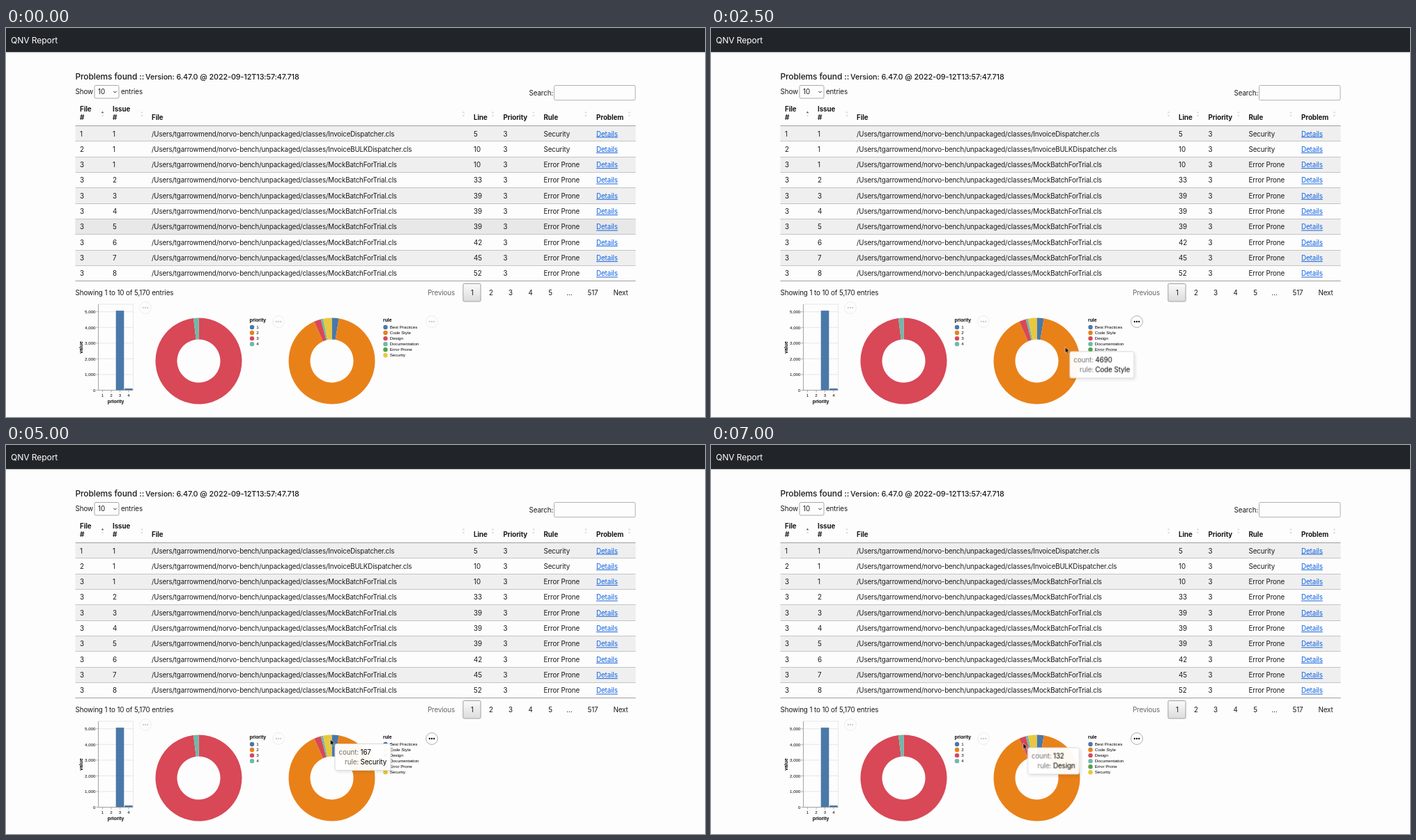
Animation of 1003 by 559 pixels, one loop 8 s. Source, as an HTML page:

```html
<!DOCTYPE html>
<html lang="en">
<head>
<meta charset="utf-8">
<title>QNV Report</title>
<style>
  html, body { margin: 0; width: 100%; height: 100%; overflow: hidden; background: #fdfdfd; }
  body { position: relative; font: 9.8px Inter, "Open Sans", sans-serif; letter-spacing: -.01em; }
  svg { position: absolute; left: 0; top: 0; display: block; }
  text { fill: #171a1d; white-space: pre; }
  .bold { font-weight: 700; }
  .mid { text-anchor: middle; }
  .end { text-anchor: end; }
  .dim { fill: #666; }
  .path { font-size: 9.72px; letter-spacing: -.014em; }
  .link { fill: #0d60e0; text-decoration: underline; }
  .brand { font-size: 12.1px; fill: #fff; }
  .heading { font-size: 11.95px; font-weight: 500; }
  .version { font-size: 10.8px; font-weight: 500; }
  .chart text { font: 6.2px "Liberation Sans", Arial, sans-serif; letter-spacing: 0; fill: #000; }
  .chart .title { font-size: 6.82px; font-weight: 700; }

  .hover, .menu, .tip, .pointer { animation: 8s step-end infinite; }
  .hover { animation-name: hover; }
  .menu { opacity: .2; }
  .menu.live { animation-name: wake; }

  .mouse { position: absolute; left: 0; top: 0; animation: move 8s step-end infinite; }
  .pointer { overflow: visible; animation-name: arrive; }
  .tip {
    position: absolute; left: 6px; top: 6.3px; opacity: 0;
    display: grid; grid-template-columns: auto auto; column-gap: 2.5px;
    padding: 4.5px 5px; border: 1px solid #d9d9d9; border-radius: 3px;
    background: rgba(255, 255, 255, .95); box-shadow: 2px 2px 4px rgba(0, 0, 0, .1);
    line-height: 14px; white-space: nowrap; color: #000;
  }
  .tip i { font-style: normal; text-align: right; color: #707070; }
  .style { animation-name: style; }
  .best { animation-name: best; }
  .security { animation-name: security; }
  .docs { animation-name: docs; }
  .design { animation-name: design; }

  @keyframes move {
    0% { transform: translate(638.5px, 305px); }
    18.75% { transform: translate(508px, 453.5px); }
    31.25% { transform: translate(508.3px, 458.5px); }
    37.5% { transform: translate(477.5px, 437.5px); }
    43.75% { transform: translate(472px, 431px); }
    50% { transform: translate(465.5px, 425px); }
    62.5% { transform: translate(465.5px, 423px); }
    68.75% { transform: translate(454.5px, 423.5px); }
    75% { transform: translate(453px, 426.4px); }
    81.25% { transform: translate(450.5px, 427.5px); }
    87.5%, 100% { transform: translate(448px, 428.5px); }
  }
  @keyframes arrive { 0% { opacity: 0; } 12.5%, 100% { opacity: 1; } }
  @keyframes hover { 0% { opacity: 1; } 18.75%, 100% { opacity: 0; } }
  @keyframes wake { 0% { opacity: .2; } 18.75%, 100% { opacity: 1; } }
  @keyframes style { 0% { opacity: 0; } 18.75% { opacity: 1; } 43.75%, 100% { opacity: 0; } }
  @keyframes best { 0% { opacity: 0; } 43.75% { opacity: 1; } 50%, 100% { opacity: 0; } }
  @keyframes security { 0% { opacity: 0; } 50% { opacity: 1; } 68.75%, 100% { opacity: 0; } }
  @keyframes docs { 0% { opacity: 0; } 68.75% { opacity: 1; } 75%, 100% { opacity: 0; } }
  @keyframes design { 0% { opacity: 0; } 75%, 100% { opacity: 1; } }
</style>
</head>
<body>
<svg id="page" width="1003" height="559" viewBox="0 0 1003 559">
  <defs>
    <linearGradient id="button" x2="0" y2="1">
      <stop stop-color="#fafafa"/><stop offset="1" stop-color="#dcdcdc"/>
    </linearGradient>
  </defs>
</svg>
<div class="mouse">
  <div class="tip style"><i>count:</i><span>4690</span><i>rule:</i><span>Code Style</span></div>
  <div class="tip best"><i>count:</i><span>136</span><i>rule:</i><span>Best Practices</span></div>
  <div class="tip security"><i>count:</i><span>167</span><i>rule:</i><span>Security</span></div>
  <div class="tip docs"><i>count:</i><span>44</span><i>rule:</i><span>Documentation</span></div>
  <div class="tip design"><i>count:</i><span>132</span><i>rule:</i><span>Design</span></div>
  <svg class="pointer" width="7" height="11">
    <path d="M0 0V8.4L1.9 6.7L3.2 9.7L4.7 9L3.4 6.2H6Z" stroke="#fff" stroke-width=".6"/>
  </svg>
</div>
<script>
const page = document.getElementById('page');
const BLUE = '#4a78a8', ORANGE = '#e98119', RED = '#d84857', TEAL = '#70b8a9', GREEN = '#54a24b', YELLOW = '#e9c83e';

function add(tag, attrs, parent = page) {
  const el = document.createElementNS('http://www.w3.org/2000/svg', tag);
  for (const key in attrs) el.setAttribute(key, attrs[key]);
  return parent.appendChild(el);
}
function text(x, y, str, cls = '', parent = page, extra = {}) {
  add('text', { x, y, class: cls, ...extra }, parent).textContent = str;
}
function rect(x, y, width, height, fill, parent = page, extra = {}) {
  add('rect', { x, y, width, height, fill, ...extra }, parent);
}
function line(d, stroke, parent = page, width = 1) {
  add('path', { d, stroke, fill: 'none', 'stroke-width': width }, parent);
}

function header() {
  rect(0, 0, 1003, 34.7, '#212529');
  text(7, 22.2, 'QNV Report', 'brand');
  text(99.5, 74, 'Problems found ::', 'heading');
  text(200, 74, 'Version: 6.47.0 @ 2022-09-12T13:57:47.718', 'version');
  text(99.5, 95.3, 'Show');
  rect(127, 82.5, 35, 18.5, '#fdfdfd', page, { rx: 2, stroke: '#aaa' });
  text(132, 95.3, '10');
  line('M154.3 90.8l2.2 2.2l2.2-2.2', '#222');
  text(165, 95.3, 'entries');
  text(750.5, 96.8, 'Search:');
  rect(786.5, 82.5, 116.5, 21.2, '#fdfdfd', page, { rx: 2, stroke: '#b0b0b0' });
}

function table() {
  const cols = [106, 153, 209, 671, 713.5, 771.5, 847];
  const styles = { 2: 'path', 6: 'link' };
  const top = 140.6, pitch = 22.33;
  ['File', 'Issue'].forEach((s, i) => {
    text(cols[i], 120, s, 'bold');
    text(cols[i], 132, '#', 'bold');
  });
  ['File', 'Line', 'Priority', 'Rule', 'Problem'].forEach((s, i) => text(cols[i + 2], 132, s, 'bold'));
  [138.5, 195, 656.5, 698.5, 757, 832, 894.5].forEach((x, i) => {
    add('path', { d: `M${x - 1.8} 122.2h3.6l-1.8-2.8z`, fill: i ? '#dcdcdc' : '#54687a' });
    add('path', { d: `M${x - 1.8} 125h3.6l-1.8 2.8z`, fill: '#dcdcdc' });
  });

  const names = ['InvoiceDispatcher', 'InvoiceBULKDispatcher', 'MockBatchForTrial'];
  const lines = [5, 10, 10, 33, 39, 39, 39, 42, 45, 52];
  lines.forEach((num, i) => {
    const y = top + pitch * i, file = Math.min(i, 2);
    if (i % 2 === 0) rect(99.5, y, 804, pitch, '#efefef');
    if (i === 6) rect(99.5, y, 804, pitch, '#e8e8e8', page, { class: 'hover' });
    const cells = [file + 1, Math.max(1, i - 1), `/Users/tgarrowmend/norvo-bench/unpackaged/classes/${names[file]}.cls`,
      num, 3, i < 2 ? 'Security' : 'Error Prone', 'Details'];
    cells.forEach((s, c) => text(cols[c], y + 14.9, s, styles[c]));
  });
  for (let i = 0; i <= 10; i++) {
    const edge = i % 10 === 0;
    line(`M99.5 ${Math.floor(top + pitch * i) + .5}h804`, edge ? '#a0a0a0' : '#c4c4c4');
  }

  text(99.5, 383.5, 'Showing 1 to 10 of 5,170 entries');
  text(624.5, 384, 'Previous', 'mid dim');
  rect(655.9, 367.5, 25.2, 25.5, 'url(#button)', page, { rx: 1.5, stroke: '#a0a0a0' });
  const spots = [669, 696, 724, 752.5, 781, 808.5, 842, 882];
  [1, 2, 3, 4, 5, '…', 517, 'Next'].forEach((s, i) => text(spots[i], 384, s, 'mid'));
}

function bars(g) {
  const zero = 520.5, unit = 22.55;
  for (let i = 0; i < 6; i++) {
    const y = zero - unit * i;
    line(`M132.5 ${y}h50`, '#ddd', g, .7);
    line(`M129.5 ${y}h3`, '#888', g, .7);
    text(128.5, y + 2.2, i ? i + ',000' : '0', 'end', g);
  }
  rect(132.5, 397, 50, 123.5, 'none', g, { stroke: '#ddd', 'stroke-width': .7 });
  rect(157.7, zero - 5.07 * unit, 11.6, 5.07 * unit, BLUE, g);
  rect(170.1, 518, 11.6, 2.5, BLUE, g);
  line(`M132.5 397V${zero}H182.5`, '#888', g, .7);
  for (let i = 0; i < 4; i++) {
    const x = 138.6 + 12.45 * i;
    line(`M${x} ${zero}v3`, '#888', g, .7);
    text(x, 530, i + 1, 'mid', g);
  }
  text(157.5, 539.3, 'priority', 'title mid', g);
  text(0, 0, 'value', 'title mid', g, { transform: 'translate(109.5 459) rotate(-90)' });
}

function donut(g, cx, slices) {
  const cy = 478.5, outer = 62, inner = 31;
  const total = slices.reduce((sum, s) => sum + s[0], 0);
  const at = (r, a) => `${cx + r * Math.sin(a)} ${cy - r * Math.cos(a)}`;
  let from = 0;
  for (const [count, fill] of slices) {
    const to = from + count / total * 2 * Math.PI, big = +(to - from > Math.PI);
    const rim = `M${at(outer, from)}A${outer} ${outer} 0 ${big} 1 ${at(outer, to)}`;
    const hole = `L${at(inner, to)}A${inner} ${inner} 0 ${big} 0 ${at(inner, from)}Z`;
    add('path', { fill, d: rim + hole }, g);
    from = to;
  }
}

function legend(g, x, title, items) {
  text(x, 421.8, title, 'title', g);
  items.forEach(([label, fill], i) => {
    const cy = 430 + 8.05 * i;
    add('circle', { cx: x + 3.5, cy, r: 3.2, fill }, g);
    text(x + 9.7, cy + 2.1, label, '', g);
  });
}

function menu(cx, cy, live) {
  const g = add('g', { class: live ? 'menu live' : 'menu' });
  add('circle', { cx, cy, r: 8.4, fill: '#fff', stroke: '#999', 'stroke-width': .8 }, g);
  for (const d of [-3.2, 0, 3.2]) add('circle', { cx: cx + d, cy, r: 1.15 }, g);
}

header();
table();
const chart = add('g', { class: 'chart' });
bars(chart);
donut(chart, 276.5, [[5070, RED], [100, TEAL]]);
legend(chart, 349.5, 'priority', [[1, BLUE], [2, ORANGE], [3, RED], [4, TEAL]]);
donut(chart, 467.5, [[136, BLUE], [4690, ORANGE], [132, RED], [44, TEAL], [1, GREEN], [167, YELLOW]]);
legend(chart, 541, 'rule', [['Best Practices', BLUE], ['Code Style', ORANGE], ['Design', RED],
  ['Documentation', TEAL], ['Error Prone', GREEN], ['Security', YELLOW]]);
menu(200, 402);
menu(391, 422);
menu(611, 422, true);
</script>
</body>
</html>
```
